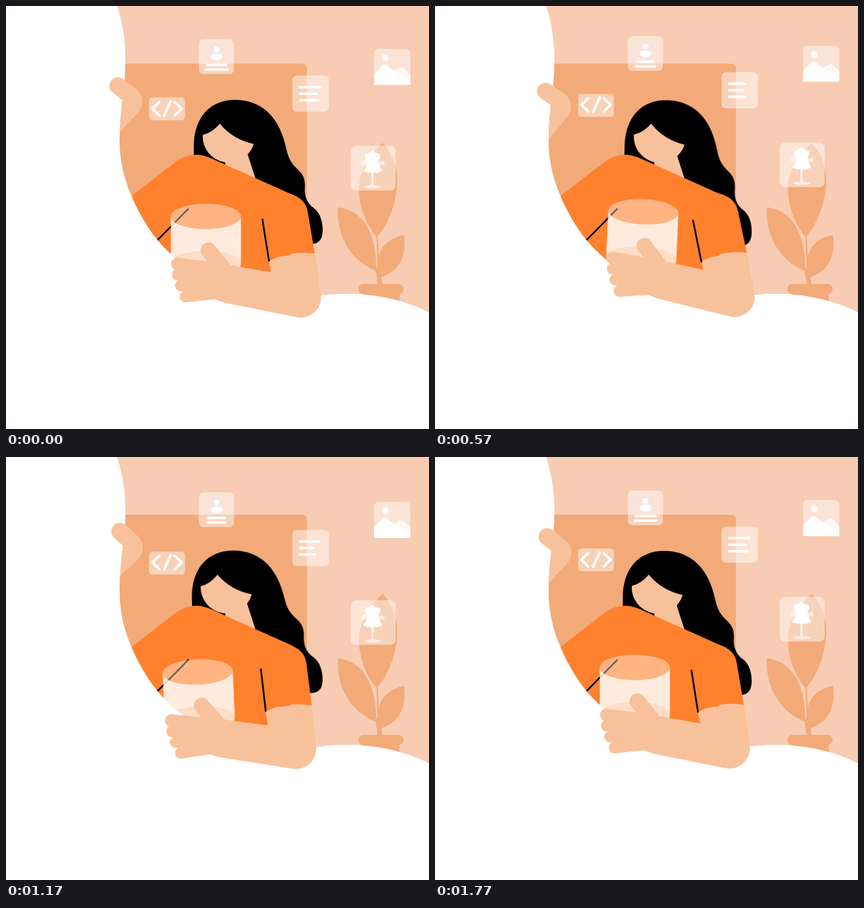
These frames come from a looping animation (748 by 748 pixels, 1.8 s). An HTML page:

```html
<!DOCTYPE html>
<html lang="en">
<head>
<meta charset="utf-8">
<title>Woman with a cup</title>
<style>
  html, body { margin: 0; width: 100%; height: 100%; overflow: hidden; background: #fff; }
  svg { display: block; width: 100vw; height: 100vh; }

  .sway, .float {
    animation: 1800ms cubic-bezier(.333, 0, .667, 1) infinite;
  }
  .sway { animation-name: sway; }
  .float { animation-name: float; }
  .late { animation-delay: -1680ms; }
  .line, .nudge {
    animation: shrink 900ms ease-in-out infinite alternate;
    animation-delay: var(--d, 0ms);
  }
  .nudge { animation-name: nudge; }

  .head { --a: 1.25deg; transform-origin: 380px 400px; }
  .hand { --a: -4.2deg; transform-origin: 332px 180px; }
  .arm { --a: -2.4deg; transform-origin: 500px 310px; }
  .forearm { --a: 4.9deg; transform-origin: 521px 515px; }
  .list .line { transform-origin: 518px 0; }
  .contact .line { transform-origin: 372.5px 0; }

  @keyframes sway {
    0%, 100% { transform: rotate(0deg); }
    33.333% { transform: rotate(var(--a)); }
    66.667% { transform: rotate(calc(var(--a) * -1)); }
  }
  @keyframes float {
    0%, 100% { transform: translateY(0); }
    33.333% { transform: translateY(-6px); }
    66.667% { transform: translateY(6px); }
  }
  @keyframes shrink { to { transform: scaleX(.8); } }
  @keyframes nudge { to { transform: translateY(-1.4px); } }

  .wall { fill: #f7ccb2; }
  .deep { fill: #f2aa79; }
  .skin { fill: #f7c19b; }
  .shirt { fill: #ff812e; }
  .limb { fill: none; stroke: #f7c19b; stroke-linecap: round; }
  .seam { fill: none; stroke: #000; stroke-width: 3; stroke-linecap: round; }
  .card { fill: #fff; fill-opacity: .47; }
  .white { fill: #fff; }
  .ink { fill: none; stroke: #fff; stroke-width: 4.4; stroke-linecap: round; stroke-linejoin: round; }
</style>
</head>
<body>
<svg viewBox="0 0 748 748">
  <defs>
    <path id="blob" d="M196 0C206 28 211 60 211 100C211 150 201 180 201 240
      C201 270 208 305 222 336C233 362 250 392 268 414C295 447 350 490 400 505
      C450 518 510 518 557 512C620 504 690 512 748 542V0Z"/>
    <clipPath id="room"><use href="#blob"/></clipPath>
  </defs>

  <g clip-path="url(#room)">
    <use href="#blob" class="wall"/>
    <rect class="deep" x="150" y="102" width="382" height="300" rx="8"/>

    <!-- plant -->
    <g class="deep">
      <path d="M666 242C688 265 694 295 691 322C687 360 673 388 656 409C640 391 625 362 624 324C624 290 645 262 666 242Z"/>
      <path d="M587 356C625 361 654 390 655 468C617 456 583 412 587 356Z"/>
      <path d="M704 405C708 442 697 468 663 480L657 462C656 433 671 411 704 405Z"/>
      <path d="M655 404L657 404L660 455L666 494H658L653 466L657 462Z"/>
      <rect x="623" y="491.5" width="80" height="17.5" rx="8.7"/>
      <path d="M632 505H696V540H632Z"/>
    </g>

    <g class="hand sway">
      <path class="skin" d="M208 130L231 148Q241 156 241 168Q241 180 233 189L201 223L180 246L190 150Z"/>
    </g>
  </g>

  <g class="hand sway">
    <path class="limb" stroke-width="30" d="M198 141L222 160"/>
  </g>

  <!-- head -->
  <g class="head sway">
    <path d="M332 300V250C332 195 362 166 405 166C445 166 470 188 483 215C492 234 494 246 497 258
      C502 277 511 284 518 291C527 300 529 309 528.5 320C527 338 534 350 544 357
      C556 366 560 382 560 396C560 412 554 420 541 421L430 410Z"/>
  </g>
  <path class="skin" d="M386 262L389 290L445 317L423 249Z"/>
  <g class="head sway">
    <path class="skin" d="M348 228Q365 224 378 208Q401 236 438 244A46 46 0 0 1 348 228Z"/>
  </g>

  <!-- torso -->
  <g clip-path="url(#room)">
    <path class="shirt" d="M200 353L302 274Q330 255 361 268.500L505 333L520 380L480 520H200Z"/>
    <path class="seam" d="M322 359L262 420"/>
  </g>

  <!-- arm with cup -->
  <g class="arm sway">
    <path class="skin" d="M464 446L469 471L473 490L521 530L557 513L546 434Z"/>
    <path class="shirt" d="M472 326L503 332Q530 341 533.500 364L546 438Q502 432 465 451L453 377Z"/>
    <path class="seam" d="M453.500 377.500L465 450.500"/>
    <g class="forearm sway">
      <ellipse class="white" opacity=".4" cx="353.500" cy="372" rx="62" ry="22.500"/>
      <path class="white" opacity=".84" d="M291.500 372V456A62 22.500 0 0 1 415.500 456V372A62 22.500 0 0 1 291.500 372Z"/>
      <ellipse class="white" opacity=".73" cx="353.500" cy="456" rx="62" ry="22.500"/>
      <path class="limb" stroke-width="28" d="M358 432L385 465"/>
      <g class="skin">
        <path d="M304 445L343 450L396 458L469 471L540 484L557 515A36 36 0 0 1 514 550.300
          L386 524.500Q377 522 370 518.500L318 524L309 495L304 475Z"/>
        <circle cx="303" cy="456" r="11"/>
        <circle cx="304" cy="475" r="10.500"/>
        <circle cx="309" cy="494.500" r="10"/>
        <circle cx="317.500" cy="514" r="10.200"/>
      </g>
    </g>
  </g>

  <!-- contact card -->
  <g class="contact float late">
    <rect class="card" x="341" y="58.300" width="62" height="61.500" rx="8"/>
    <circle cx="372" cy="80.500" r="15" fill="#eee5e0" opacity=".55"/>
    <circle class="white" cx="372.300" cy="76.300" r="5.300"/>
    <ellipse class="white" cx="372.300" cy="89.200" rx="10.400" ry="6.300"/>
    <path class="ink line" style="--d:-80ms" d="M355.200 103.500H389.800"/>
    <path class="ink line" style="--d:-1770ms" d="M353.200 111.700H391.800"/>
  </g>

  <!-- picture card -->
  <g class="float late">
    <path class="card" d="M651 139V83.300Q651 75.300 659 75.300H707Q715 75.300 715 83.300V139Z"/>
    <circle class="white" cx="670.700" cy="90.800" r="7" opacity=".4"/>
    <circle class="white" cx="670.700" cy="90.800" r="5"/>
    <path class="white" opacity=".75" d="M680 118L696 108.500Q700 106 704 109.500L715 121V139H680Z"/>
    <path class="white" d="M651 120L665 105.500Q669 101.500 674 105L690 117L715 131V139H651Z"/>
  </g>

  <!-- text card -->
  <g class="list float">
    <rect class="card" x="506.500" y="123" width="64.500" height="64" rx="8"/>
    <path class="ink line" style="--d:-180ms" d="M520.200 143.500H556.800"/>
    <path class="ink line" style="--d:-60ms" d="M520.200 155H549.500"/>
    <path class="ink line" style="--d:-1710ms" d="M520.200 166.500H552.300"/>
  </g>

  <!-- code card -->
  <g class="float">
    <rect class="card" x="253" y="161.500" width="63.500" height="40.500" rx="6"/>
    <path class="ink nudge" d="M271 170L259 181.500L271 193.500M291 169L279.500 194.500M298.500 170L310.500 181.500L298.500 193.500"/>
  </g>

  <!-- mannequin card -->
  <g class="float">
    <rect class="card" x="609.500" y="247.300" width="79.500" height="79" rx="9"/>
    <g class="white">
      <g opacity=".6">
        <path d="M646 292H650V318H646Z"/>
        <ellipse cx="648" cy="319.500" rx="15" ry="3"/>
        <path d="M638 270Q627 274 629 280Q632 284 640 281ZM658 276L667 274Q671 278 669 281L657 283Z"/>
      </g>
      <circle cx="648" cy="259.500" r="3.500"/>
      <path d="M644 259Q648 264 652 259L661 262Q663 267 660 271L658 278L665 291Q664 294 660 293
        Q656 297 652 294Q648 298 644 294Q640 297 637 293Q632 294 632 291L640 278L636 270Q633 265 636 261Z"/>
    </g>
  </g>
</svg>
</body>
</html>
```
